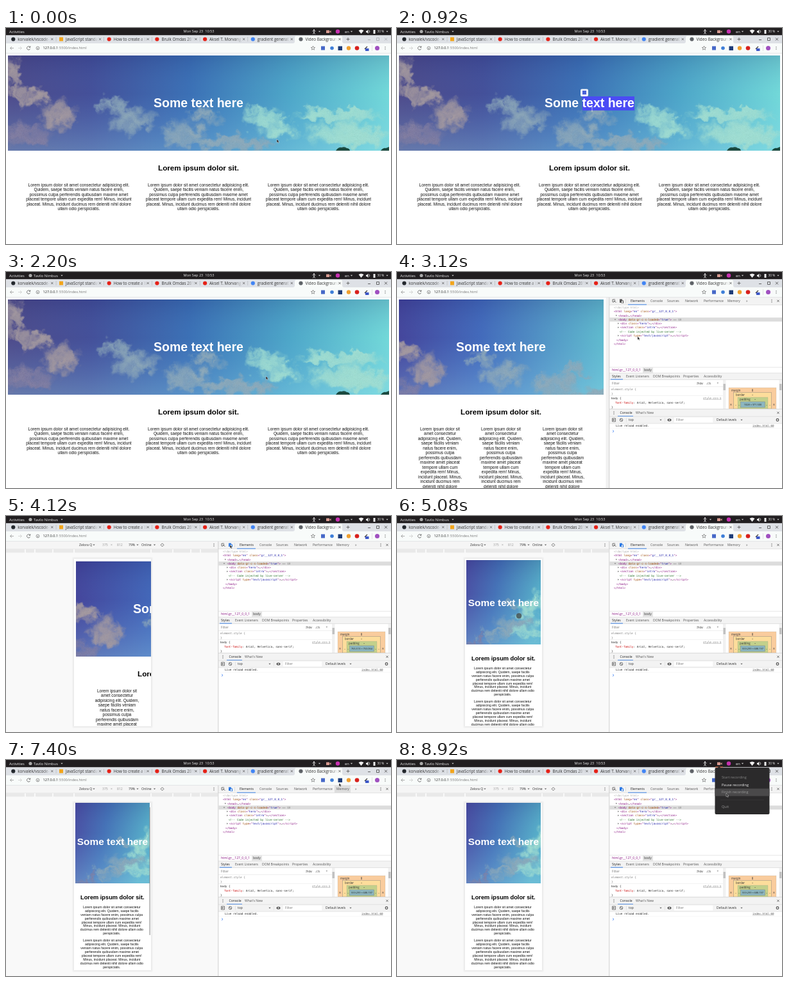
Animation, 600 px wide and 338 px high, one loop 9000 ms. Source, as an HTML page:

```html
<!DOCTYPE html>
<html lang="en">
<head>
<meta charset="utf-8">
<title>Video background demo</title>
<style>
html, body { margin: 0; width: 100%; height: 100%; overflow: hidden; background: #fff; }
svg { display: block; }
#stage { width: 100vw; height: 100vh; }
text { white-space: pre; }
.ui { font-family: "Open Sans", "Noto Sans", sans-serif; }
.page { font-family: "Liberation Sans", Arial, sans-serif; }
.mono { font-family: "DejaVu Sans Mono", monospace; }
</style>
</head>
<body>
<svg id="stage" viewBox="0 0 600 338" xmlns="http://www.w3.org/2000/svg"></svg>
<script>
const LOOP = 9000;
const esc = s => s.replace(/&/g, '&amp;').replace(/</g, '&lt;');

// Text is placed by its vertical middle.
const text = (x, y, s, size = 5.4, fill = '#333', more = '') =>
  `<text x="${x}" y="${(y + size * .35).toFixed(2)}" font-size="${size}" fill="${fill}" ${more}>${esc(s)}</text>`;
const mid = (x, y, s, size, fill, more = '') => text(x, y, s, size, fill, 'text-anchor="middle" ' + more);
const rect = (x, y, w, h, fill, more = '') =>
  `<rect x="${x}" y="${y}" width="${w}" height="${h}" fill="${fill}" ${more}/>`;
const dot = (x, y, r, fill, more = '') => `<circle cx="${x}" cy="${y}" r="${r}" fill="${fill}" ${more}/>`;
const line = (d, color = '#555', w = .8) => `<path d="${d}" fill="none" stroke="${color}" stroke-width="${w}"/>`;
const down = (x, y, color = '#555', r = 1.6) => `<path d="M${x - r} ${y - r / 2}h${2 * r}l${-r} ${r * 1.1}z" fill="${color}"/>`;
const cross = (x, y, r = 1.6, color = '#555') =>
  line(`M${x - r} ${y - r}l${2 * r} ${2 * r}m0 ${-2 * r}l${-2 * r} ${2 * r}`, color);
const dots = (x, y, color = '#555') => [-2, 0, 2].map(d => dot(x, y + d, .6, color)).join('');
const group = (id, body, more = '') => `<g id="${id}" ${more}>${body}</g>`;

let seed = 7;
const rand = () => (seed = seed * 16807 % 2147483647) / 2147483647;

// ---- sky video ----
function cloud([x, y, w, h, tone]) {
  let s = '';
  const n = 18 + Math.round(w / 3);
  for (let i = 0; i < n; i++) {
    const a = rand() * 6.28, d = Math.sqrt(rand());
    const rx = (.1 + rand() * .18) * w, ry = (.14 + rand() * .2) * h;
    const cx = x + Math.cos(a) * d * w * .42, cy = y + Math.sin(a) * d * h * .4;
    s += `<ellipse cx="${cx.toFixed(1)}" cy="${cy.toFixed(1)}" rx="${rx.toFixed(1)}" ry="${ry.toFixed(1)}" fill="url(#${tone})"/>`;
  }
  return s;
}
const wideClouds = [
  [4, 36, 38, 64, 'warm'], [18, 62, 40, 34, 'warm'], [50, 68, 46, 30, 'warm'], [82, 97, 56, 50, 'warm'],
  [24, 128, 90, 40, 'dusk'], [166, 77, 46, 28, 'pale'], [196, 102, 66, 46, 'pale'], [276, 122, 72, 40, 'pale'],
  [308, 95, 48, 26, 'pale'], [395, 94, 58, 34, 'cool'], [425, 114, 62, 32, 'cool'],
  [516, 93, 130, 22, 'cool'], [540, 124, 130, 40, 'cool'], [350, 138, 120, 26, 'pale']
];
const tallClouds = [
  [98, 78, 44, 34, 'cool'], [112, 62, 30, 30, 'cool'], [72, 98, 56, 26, 'pale'], [94, 112, 50, 24, 'cool'],
  [44, 114, 50, 18, 'pale'], [68, 68, 22, 18, 'pale'], [10, 126, 36, 20, 'dusk']
];
const hero = (x, y, w, h, tint, clouds, shift, trees = '') =>
  `<svg x="${x}" y="${y}" width="${w}" height="${h}">${rect(0, 0, w, h, `url(#${tint})`)}` +
  rect(0, 0, w, h, 'url(#haze)') +
  `<g transform="translate(${shift})"><g class="drift"><g filter="url(#billow)">${clouds.map(cloud).join('')}</g></g></g>${trees}</svg>`;
const trees = '<path d="M511 149q4-6 9-5q5-2 8 1q4 0 5 4zM581 149q4-5 8-4l5-2v6z" fill="#1b4a40"/>';

// ---- web page ----
const wrap = s => s.split('|');
const wideLines = wrap('Lorem ipsum dolor sit amet consectetur adipisicing elit.|Quidem, saepe facilis veniam natus facere enim,|possimus culpa perferendis quibusdam maxime amet|placeat tempore ullam cum expedita rem! Minus, incidunt|placeat. Minus, incidunt ducimus rem deleniti nihil dolore|ullam odio perspiciatis.');
const slimLines = wrap('Lorem ipsum dolor sit|amet consectetur|adipisicing elit. Quidem,|saepe facilis veniam|natus facere enim,|possimus culpa|perferendis quibusdam|maxime amet placeat|tempore ullam cum|expedita rem! Minus,|incidunt placeat. Minus,|incidunt ducimus rem|deleniti nihil dolore|ullam odio perspiciatis.');
const phoneLines = wrap('Lorem ipsum dolor sit amet consectetur|adipisicing elit. Quidem, saepe facilis|veniam natus facere enim, possimus culpa|perferendis quibusdam maxime amet|placeat tempore ullam cum expedita rem!|Minus, incidunt placeat. Minus, incidunt|ducimus rem deleniti nihil dolore ullam odio|perspiciatis.');
const para = (x, y, lines, size) => lines.map((s, i) => mid(x, y + i * size * 1.155, s, size, '#111')).join('');
const bold = 'font-weight="700"';
const title = (x, y, size) => mid(x, y, 'Some text here', size, '#fff', bold);
const heading = (x, y, size) => mid(x, y, 'Lorem ipsum dolor sit.', size, '#000', bold);

const widePage = group('wide',
  hero(3, 43, 594, 149, 'tint', wideClouds, '-3 0', trees) +
  rect(289, 107, 81, 22, '#4b4bf4', 'id="mark"') + title(300, 117.5, 19.5) + heading(300, 219, 11.7) +
  [113.5, 300, 487].map(x => para(x, 245.5, wideLines, 6.5)).join('') +
  group('bubble', rect(286, 95.5, 12, 11.5, '#f4f4fb', 'rx="2"') + rect(289, 98, 6, 6, '#4a62d8')), 'class="page"');

const slimPage = hero(3, 43, 319, 149, 'slimTint', wideClouds, '-42 16') + title(162, 117.5, 19.5) + heading(162, 219, 11.7) +
  [67, 162, 258].map(x => para(x, 245.5, slimLines, 6.5)).join('');

const phonePage = hero(108, 69, 116, 132, 'tallTint', tallClouds, '-8 4') + title(166, 136, 15.4) + heading(165.8, 222.5, 9.24) +
  [238, 290.5, 343].map(y => para(164.8, y, phoneLines, 5.135)).join('');

// ---- browser frame ----
const tabs = [
  ['#24292e', 'korvalek/vscode-'], ['#f2a51c', 'JavaScript standa'], ['#e62117', 'How to create a b'], ['#e62117', 'Brulk Omdas 2019'],
  ['#e62117', 'Aksel T. Morvang'], ['#4285f4', 'gradient generat'], ['#5f6368', 'Video Background']
];
function tab([color, name], i) {
  const x = 11.3 + i * 74.7, on = i == 6;
  return (on ? '<path d="M447 24q3 0 3-3v-6q0-2.5 2.5-2.5h69q2.5 0 2.5 2.5v6q0 3 3 3z" fill="#f8fbfa"/>' : '') +
    (i == 1 ? rect(x - 3, 14.5, 6, 6, color) : dot(x, 17.5, 3.1, color)) + text(x + 7, 17.5, name, 6.3, '#333') +
    rect(x + 46, 13, 12, 10, on ? 'url(#fadeOn)' : 'url(#fade)') + rect(x + 58, 13, 6, 9, on ? '#f8fbfa' : '#dee1e6') + cross(x + 60.5, 17.5) +
    (i < 5 ? rect(x + 66.5, 14, .5, 7, '#a5a8ad') : '');
}
const frame = group('frame',
  rect(0, 0, 600, 11.5, '#211e20') + text(5, 5.5, 'Activities', 5.8, '#eee') +
  group('app', dot(38, 5.5, 2.6, '#aaa') + text(43, 5.5, 'Tavilo Nimbus', 5.8, '#eee') + down(87, 5.5, '#ddd')) +
  mid(300.5, 5.5, 'Mon Sep 23  10:53', 5.6, '#eee') +
  dot(480, 3, 1, '#eee') + line('M477.5 4.8h5M480 4.5v2l-1.5 3M480 6.5l1.5 3', '#eee') + down(488.5, 5.5, '#ddd') +
  rect(499, 3.5, 5, 4.5, '#d89a90') + '<path d="M504 5.7l2.5-2v4z" fill="#d89a90"/>' + dot(517, 5.5, 3.2, '#c830b0') +
  text(528, 5.5, 'en', 5.8, '#eee') + down(538.5, 5.5, '#ddd') +
  '<path d="M549.5 4q4-3 8 0l-4 5z" fill="#eee"/><path d="M561 4.5h1.5l2-2v6.5l-2-2h-1.5z" fill="#eee"/>' +
  line('M566 3.5q1.5 2 0 4', '#eee') + rect(572.5, 3, 3, 6, '#eee') + text(578.5, 5.5, '30 %', 4.9, '#eee') + down(594, 5.5, '#ddd') +
  rect(0, 11.5, 600, 12.5, '#dee1e6') + tabs.map(tab).join('') + line('M530.5 17.5h5m-2.5-2.5v5') +
  group('buttons', line('M564 18.5h4M577.5 15.5h4v4h-4z', '#444') + cross(592, 17.5, 2, '#444')) +
  rect(0, 24, 600, 15.5, '#f8fbfa') + rect(0, 39.2, 600, .6, '#d5d7da') +
  line('M12 31.5h-5.5m2.5-2.5l-2.5 2.5l2.5 2.5', '#999') + line('M19 31.5h5.5m-2.5-2.5l2.5 2.5l-2.5 2.5', '#ccc') +
  line('M37.5 30a2.7 2.7 0 1 0 .2 2.5') + line('M37.8 28.3v2h-2') +
  dot(49.5, 31.5, 2.4, 'none', 'stroke="#666" stroke-width=".7"') + line('M49.5 31v2', '#666') +
  text(57.5, 31.5, '127.0.0.1', 5.6, '#222') + text(81.5, 31.5, ':5500/index.html', 5.6, '#777') +
  '<path d="M478.5 28.3l.9 2 2.2.2-1.7 1.5.5 2.2-1.9-1.2-1.9 1.2.5-2.2-1.7-1.5 2.2-.2z" fill="none" stroke="#555" stroke-width=".6"/>' +
  rect(491, 28.5, 6, 6, '#4668c8') + dot(508, 31.5, 2.8, '#3f7fd8') + rect(517.5, 28.5, 6.5, 6.5, '#1d3c78') +
  dot(534, 31.5, 3.2, '#f0a030') + dot(547, 31.5, 3.3, '#d8201c') + line('M559 33l4-4', '#444', 1.4) + rect(560, 32, 5.5, 4, '#3d57c8') +
  rect(570, 27, .5, 9, '#ccc') + dot(578.5, 31.5, 3.5, '#a050c0') + dots(591, 31.5), 'class="ui"');

// ---- developer tools ----
const TAG = '#881280', ATT = '#994500', VAL = '#1a1aa6', GRAY = '#888';
const code = (x, y, ...parts) => {
  let s = '';
  for (let i = 0; i < parts.length; i += 2) s += `<tspan fill="${parts[i]}">${esc(parts[i + 1])}</tspan>`;
  return `<text class="mono" x="${x}" y="${y + 1.5}" font-size="4.3">${s}</text>`;
};
const twist = (x, y, open) => open ? down(x, y, '#666', 1.3) : `<path d="M${x - .8} ${y - 1.3}v2.6l1.6-1.3z" fill="#666"/>`;
const block = (x, y, tag, name, val) => twist(x - 3, y) +
  code(x, y, TAG, '<' + tag + (name ? ' ' : ''), ATT, name, TAG, name && '="', VAL, val, TAG, (name && '"') + '>', '#333', '…', TAG, `</${tag}>`);
const names = (y, list, size = 5.1) => list.map(([x, s], i) => text(x, y, s, size, i ? '#555' : '#222')).join('');

const tools = group('tools',
  rect(331, 39.8, 269, 299, '#fff') + rect(331, 39.8, 269, 11.7, '#f3f3f3') + rect(331, 51.3, 269, .5, '#ccc') +
  rect(512, 40, 25, 11.3, '#dedede', 'id="hover"') +
  line('M340 43h-4v4h2M338.5 45l3 3m-3-1v-2h2') +
  '<path id="device" d="M347 42.5h4v2h2v4.5h-3.5v-1h-2.5zM350 45.5v3h2v-3z" fill-rule="evenodd"/>' + rect(356.5, 42, .5, 7, '#ccc') +
  names(45.3, [[364, 'Elements'], [395, 'Console'], [421, 'Sources'], [449, 'Network'], [478, 'Performance'], [515, 'Memory'], [544, '»']]) +
  rect(360, 50.5, 29, 1, '#3b82e8') + dots(584, 45.3) + cross(594, 45.3) +
  code(338, 55.5, '#aaa', '<!doctype html>') +
  code(338, 61.8, TAG, '<html ', ATT, 'lang', TAG, '="', VAL, 'en', TAG, '" ', ATT, 'class', TAG, '="', VAL, 'gr__127_0_0_1', TAG, '">') +
  block(345, 68, 'head', '', '') + rect(331.5, 71.3, 268.5, 6.2, '#dcdcdc') + twist(340, 74.5, 1) +
  code(345, 74.5, TAG, '<body ', ATT, 'data-gr-c-s-loaded', TAG, '="', VAL, 'true', TAG, '">', GRAY, ' == $0') +
  block(348, 80.5, 'div', 'class', 'hero') + block(348, 86.8, 'section', 'class', 'intro') +
  code(347, 93.2, '#236e25', '<!-- Code injected by live-server -->') + block(348, 99.5, 'script', 'type', 'text/javascript') +
  code(342, 106, TAG, '</body>') + code(338, 112.5, TAG, '</html>') +
  rect(331, 148.8, 269, 9, '#fff') + rect(331, 148.8, 269, .5, '#ccc') + rect(383, 149.3, 16, 8.5, '#e4e4e4') +
  text(335, 153.3, 'html.gr__127_0_0_1', 5, TAG) + text(385, 153.3, 'body', 5, '#333') +
  rect(331, 157.8, 269, 11, '#f3f3f3') + rect(331, 157.8, 269, .5, '#ccc') + rect(331, 168.5, 269, .5, '#ccc') +
  names(163.3, [[335, 'Styles'], [357, 'Event Listeners'], [399, 'DOM Breakpoints'], [446, 'Properties'], [478, 'Accessibility']]) + rect(333, 167.5, 19, 1, '#3b82e8') +
  text(335, 174.3, 'Filter', 5, '#777') + names(174.3, [[467, ':hov'], [482, '.cls'], [498.5, '+']], 5) +
  rect(331, 179.3, 177, .5, '#ddd') + code(334, 183.5, '#777', 'element.style {') + code(334, 190, '#777', '}') + rect(331, 193.5, 177, .4, '#ddd') +
  code(334, 197.5, '#222', 'body {') + code(477, 197.5, '#777', 'style.css:1') + rect(477, 199.5, 28.5, .4, '#999') +
  code(340, 204, '#c80000', 'font-family', '#222', ': Arial, Helvetica, sans-serif;') + code(334, 211, '#222', '}') +
  [508, 595.5].map(x => rect(x, 169, 4.5, 45, '#f1f1f1') + rect(x + .5, 175, 3.5, 10, '#c1c1c1')).join('') +
  rect(517, 181, 74, 33, '#f9cc9d', 'stroke="#999" stroke-width=".4" stroke-dasharray="1"') + rect(524.5, 188.5, 59, 25.5, '#fddd9b', 'stroke="#777" stroke-width=".4"') +
  rect(531, 196, 47, 18, '#c3d08b', 'stroke="#888" stroke-width=".4" stroke-dasharray="1"') + rect(535.5, 203, 38, 9, '#8cb6c0', 'stroke="#777" stroke-width=".4"') +
  text(521, 185, 'margin', 4.4) + mid(554, 185, '8', 4.4) + text(528, 192.3, 'border', 4.4) + mid(554, 192.3, '–', 4.4) + text(534, 199.8, 'padding', 4.4) + mid(558, 199.8, '–', 4.4) +
  [[520.5, '8'], [528, '–'], [533, '–'], [576, '–'], [581, '–'], [587.5, '8']].map(([x, s]) => mid(x, 207.5, s, 4.2)).join('') +
  mid(554.5, 207.5, '', 3.9, '#222', 'id="size"') +
  rect(331, 214, 269, 12, '#f3f3f3') + rect(331, 214, 269, .6, '#ccc') + dots(338, 220.3) +
  names(220.3, [[347.5, 'Console'], [372, "What's New"]]) + cross(594, 220.3) + rect(344, 225, 24, 1, '#3b82e8') +
  rect(331, 226, 269, 11, '#f3f3f3') + rect(331, 225.8, 269, .5, '#ccc') + rect(331, 236.8, 269, .5, '#ccc') +
  line('M335.5 229h5v5h-5zM337 230.5l2 1l-2 1z') + dot(349.5, 231.5, 2.3, 'none', 'stroke="#555" stroke-width=".8"') + line('M348 230l3 3') +
  rect(357, 228, .4, 7, '#ccc') + text(361, 231.5, 'top', 5) + down(411, 231.5) + rect(417, 228, .4, 7, '#ccc') +
  '<ellipse cx="424.5" cy="231.5" rx="3" ry="2" fill="#555"/>' + dot(424.5, 231.5, .9, '#fff') +
  rect(432, 227.5, 60, 8, '#fff') + text(435, 231.5, 'Filter', 5, '#777') + text(498, 231.5, 'Default levels', 5) + down(537, 231.5) +
  dot(593, 231.5, 1.8, 'none', 'stroke="#555" stroke-width="1.2"') +
  code(341, 240.7, '#222', 'Live reload enabled.') + code(554, 240.7, '#555', 'index.html:60') + rect(554, 242.7, 33.5, .4, '#777') + rect(331, 244.5, 269, .4, '#eee') +
  line('M336 247.5l2 1.7l-2 1.7', '#367cf1') + rect(330.5, 39.8, .7, 299, '#bbb'), 'class="ui"');

// ---- device preview ----
let ruler = '';
for (const [x, w] of [[0, 29], [31, 13], [46, 26], [74, 31], [107, 118], [227, 32], [261, 26], [289, 13], [304, 26]])
  ruler += rect(x, 52, w, 5.3, '#e9e9e9');
const bar = rect(0, 39.8, 330.5, 298.2, '#f9f9f9') + rect(0, 39.8, 330.5, 11.5, '#f5f5f5') + rect(0, 51.2, 330.5, .5, '#ddd') + ruler +
  text(114, 45.3, 'Zelora Q', 5.1) + down(137, 45.3) + text(150, 45.3, '375', 5.1, '#999') + text(163, 45.3, '×', 5.1, '#999') + text(173, 45.3, '812', 5.1, '#999') +
  text(191, 45.3, '79%', 5.1) + down(205, 45.3) + text(211, 45.3, 'Online', 5.1) + down(231.5, 45.3) +
  line('M241 45.3l2.5-2.5l2.5 2.5l-2.5 2.5z') + dots(324, 45.3);
const preview = group('preview', `<g class="ui">${bar}</g>` +
  [3, 2, 1].map(d => rect(106 - d, 67 - d, 120 + 2 * d, 262 + 2 * d, '#000', 'opacity=".018" rx="2"')).join('') + rect(106, 67, 120, 262, '#fff') +
  `<g class="page" clip-path="url(#screen)">${group('phone', phonePage)}</g>` + rect(223.5, 68, 1.3, 200, '#888', 'id="thumb"'));

// ---- panel menu ----
const menu = group('menu',
  rect(496, 10.5, 12, 1, '#e66030') + '<path d="M499 12.5l3-2.5l3 2.5z" fill="#2b2a2b"/>' + rect(495.5, 12, 85, 73, '#2b2a2b', 'rx="2"') +
  rect(495.5, 33, 85, 11.7, '#4a494a', 'id="row"') + rect(504, 62, 68, .4, '#444') +
  [[27, 'Start recording', '#858585'], [39, 'Pause recording', '#eee'], [50.5, 'Finish recording', '#9a9a9a'], [73, 'Quit', '#959595']]
    .map(([y, s, c]) => text(506, y, s, 5.6, c)).join(''), 'class="ui"');

const pointer = group('pointer',
  '<path id="arrow" d="M0 0v5.5l1.3-1.2l1 2l1-.5l-1-1.9h1.7z" fill="#222" stroke="#fff" stroke-width=".4"/>' +
  `<g id="beam">${line('M-1-3h2M0-3v6M-1 3h2', '#ddd', .7)}</g>` + dot(0, 0, 4, '#333', 'id="touch" fill-opacity=".65" stroke="#555" stroke-width=".4"'));

// ---- assembly ----
const grad = (id, kind, stops, more = '') => `<${kind}Gradient id="${id}" ${more}>` +
  stops.map(([o, c, a = 1]) => `<stop offset="${o}" stop-color="${c}" stop-opacity="${a}"/>`).join('') + `</${kind}Gradient>`;
const puff = (id, c, a) => grad(id, 'radial', [[0, c, a], [.5, c, a * .6], [1, c, 0]]);
const defs = '<defs>' +
  grad('tint', 'linear', [[0, '#4c4584'], [.22, '#414a94'], [.48, '#386db2'], [.74, '#4ba6c6'], [1, '#72dbd7']]) +
  grad('slimTint', 'linear', [[0, '#423f96'], [.4, '#4066b8'], [1, '#5fbccc']]) +
  grad('tallTint', 'linear', [[0, '#49459c'], [.45, '#436fb4'], [1, '#55adc6']], 'x2="1" y2=".2"') +
  grad('haze', 'linear', [[0, '#203078', .2], [.4, '#70b0f0', .06], [1, '#98dcf4', .34]], 'x2="0" y2="1"') +
  grad('fade', 'linear', [[0, '#dee1e6', 0], [1, '#dee1e6']]) + grad('fadeOn', 'linear', [[0, '#f8fbfa', 0], [1, '#f8fbfa']]) +
  puff('warm', '#a59a9f', .4) + puff('dusk', '#857fa0', .26) + puff('pale', '#8fa9b8', .34) + puff('cool', '#a0dcd0', .34) +
  '<filter id="billow" filterUnits="userSpaceOnUse" x="-40" y="-40" width="700" height="230" color-interpolation-filters="sRGB">' +
  '<feTurbulence type="fractalNoise" baseFrequency=".06" numOctaves="4" seed="4"/>' +
  '<feDisplacementMap in="SourceGraphic" scale="30" xChannelSelector="R" yChannelSelector="G"/></filter>' +
  '<clipPath id="screen"><rect x="106" y="67" width="120" height="262"/></clipPath></defs>';
const slim = group('slim', slimPage, 'class="page"');
document.getElementById('stage').innerHTML = defs + rect(0, 0, 600, 338, '#fff') + widePage + preview +
  `<g id="slimClip">${slim}</g>` + rect(325.5, 40, 5, 298, '#f1f1f1', 'id="track"') + tools + frame + menu + pointer;

const el = {};
document.querySelectorAll('#stage [id]').forEach(e => el[e.id] = e);
const drifts = document.querySelectorAll('.drift');
const show = (e, on) => e.style.display = on ? '' : 'none';
const move = (e, x, y) => e.setAttribute('transform', `translate(${x.toFixed(2)} ${y.toFixed(2)})`);

// Eased interpolation over [time, ...values] keys.
function track(t, keys) {
  const i = keys.findIndex(k => k[0] > t);
  if (i == 0) return keys[0].slice(1);
  if (i < 0) return keys[keys.length - 1].slice(1);
  const a = keys[i - 1], b = keys[i];
  let p = (t - a[0]) / (b[0] - a[0]);
  p = p * p * (3 - 2 * p);
  return a.slice(1).map((v, j) => v + (b[j + 1] - v) * p);
}
const path = [
  [0, 422, 174], [80, 422, 174], [450, 371, 120], [500, 371, 120], [800, 289, 122], [920, 304, 127], [1250, 325, 150],
  [1700, 380, 160], [2200, 405, 163], [2700, 400, 155], [3550, 349, 45], [4200, 349, 45], [4600, 195, 150], [5000, 190, 156],
  [5600, 190, 159], [6000, 190, 116], [6200, 190, 101], [6700, 190, 151], [7250, 515, 46], [7400, 519, 36],
  [7900, 502, 5], [8100, 502, 5], [8400, 511, 44], [8920, 513, 52]
];
const scroll = [[5600, 0], [6000, 43], [6200, 58], [6700, 8]];

function draw(t) {
  const [x, y] = track(t, path), [s] = track(t, scroll);
  const docked = t >= 2650, device = t >= 3880, phone = t >= 4440;

  drifts.forEach(d => move(d, t * .002, -t * .0004));
  show(el.app, t >= 80);
  el.buttons.setAttribute('opacity', t < 80 ? .35 : 1);

  show(el.wide, !docked);
  show(el.slimClip, docked && !phone);
  show(el.track, docked && !device);
  show(el.tools, docked);
  show(el.preview, device);
  show(el.phone, phone);
  move(el.slim, device ? 106 : 0, device ? 28 : 0);
  device ? el.slimClip.setAttribute('clip-path', 'url(#screen)') : el.slimClip.removeAttribute('clip-path');

  const left = t < 800 ? Math.max(289, Math.min(370, x)) : 289;
  show(el.mark, t >= 500 && t < 1250);
  el.mark.setAttribute('x', left);
  el.mark.setAttribute('width', 370 - left);
  show(el.bubble, t >= 840 && t < 1250);

  el.device.setAttribute('fill', device ? '#2b78e4' : '#555');
  el.size.textContent = phone ? '559.299 × 688.197' : device ? '765.513 × 763.064' : '1028 × 971.500';
  show(el.hover, t >= 7200 && t < 7520);

  move(el.phone, 0, -s);
  el.thumb.setAttribute('y', 68 + .74 * s);
  el.thumb.setAttribute('opacity', t < 5600 ? 0 : track(t, [[7400, .8], [7800, 0]])[0]);

  show(el.menu, t >= 8050);
  show(el.row, y > 33 && t > 8100);
  el.row.setAttribute('y', y > 44.7 ? 44.7 : 33);

  const touch = phone && x < 226 && x > 106, beam = t > 400 && t < 1150;
  move(el.pointer, x, y);
  show(el.touch, touch);
  show(el.beam, beam);
  show(el.arrow, !touch && !beam);
}

const start = performance.now();
function tick() {
  draw((performance.now() - start) % LOOP);
  requestAnimationFrame(tick);
}
tick();
</script>
</body>
</html>
```
